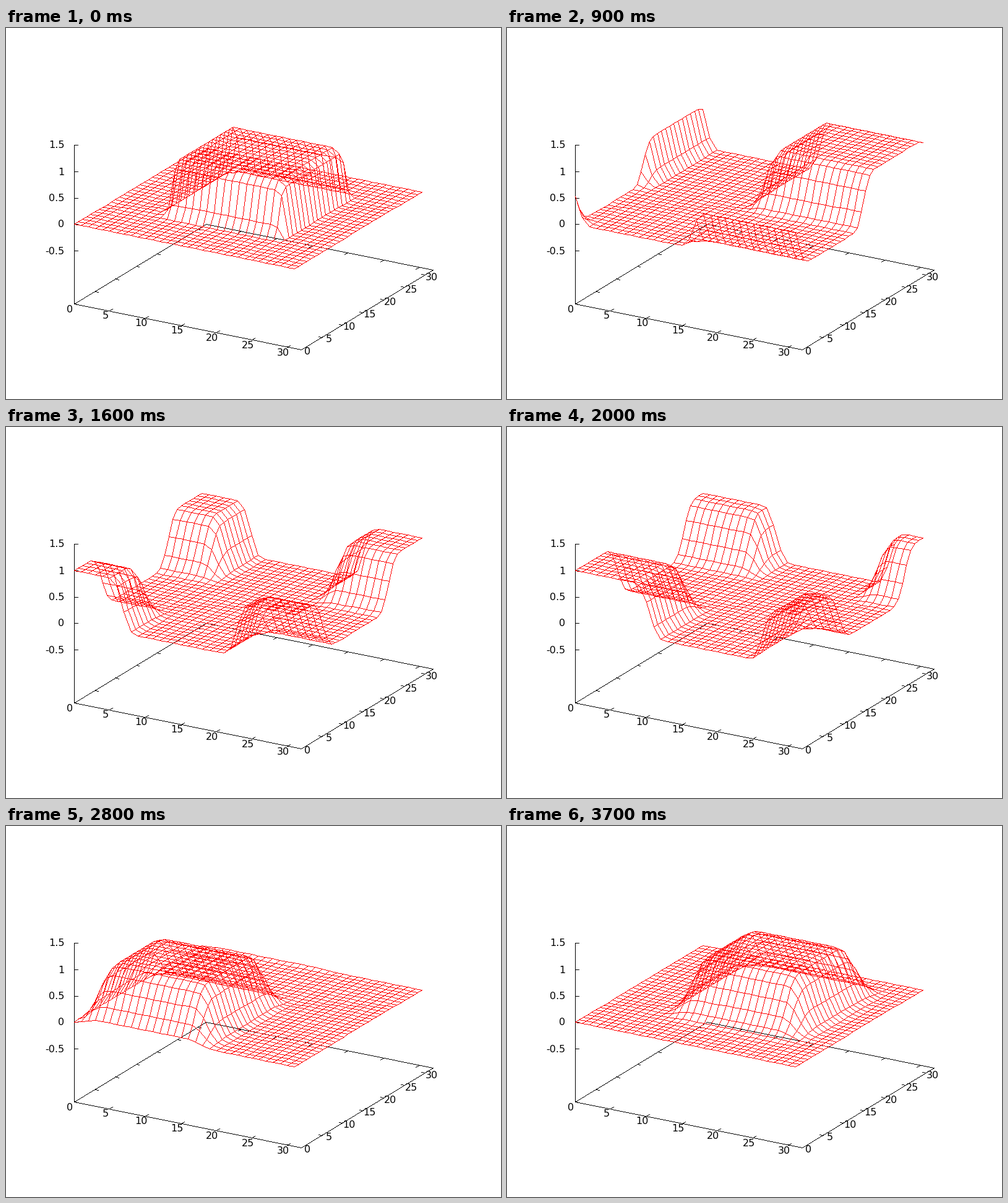
A matplotlib script that plays this animation: 800 px wide and 600 px high, repeating every 3800 ms.

```python
import numpy as np
import matplotlib.pyplot as plt
from matplotlib.animation import FuncAnimation

W, H = 800, 600
N = 32                # grid cells per side, periodic
FRAMES = 38
COURANT = 0.9
RED, BLACK = (255, 0, 0), (0, 0, 0)

TILT, TURN = np.radians([60, 30])
MIDDLE = np.array([400, 290])
SCALE = np.array([212.8, 149])
Z_MAX = 1.5


def project(x, y, z):
    """Orthographic view of the plot box, cut to whole pixels."""
    u = 2 * np.asarray(x) / N - 1
    v = 2 * np.asarray(y) / N - 1
    w = np.asarray(z) / Z_MAX
    right = np.cos(TURN) * u + np.sin(TURN) * v
    toward = np.sin(TURN) * u - np.cos(TURN) * v
    down = np.cos(TILT) * toward - np.sin(TILT) * w
    return MIDDLE + np.trunc(SCALE * np.stack([right, down], axis=-1))


def draw_segments(img, start, end, color):
    """Draw crisp one-pixel lines between pairs of points."""
    start = np.reshape(start, (-1, 2))
    delta = np.reshape(end, (-1, 2)) - start
    length = np.maximum(np.abs(delta).max(axis=1), 1)
    steps = np.arange(length.max() + 1)
    t = np.minimum(steps / length[:, None], 1)
    pts = np.rint(start[:, None] + t[..., None] * delta[:, None]).astype(int)
    img[pts[..., 1], pts[..., 0]] = color


def advect(u, c):
    """One upwind step with monotonized central slopes."""
    back = u - np.roll(u, 1)
    ahead = np.roll(u, -1) - u
    steepest = 2 * np.minimum(np.abs(back), np.abs(ahead))
    central = (back + ahead) / 2
    slope = np.where(back * ahead > 0, np.clip(central, -steepest, steepest), 0)
    flux = c * (u + 0.5 * (1 - c) * slope)
    return u - flux + np.roll(flux, 1)


def make_surfaces():
    """Split advection of a square block: y half, x full, y half step."""
    px = np.zeros(N)
    px[N // 4:3 * N // 4] = 1
    py = px.copy()
    surfaces = []
    for _ in range(FRAMES):
        px = advect(px, COURANT)
        py = advect(advect(py, COURANT / 2), COURANT / 2)
        surfaces.append(np.outer(px, py))
    return surfaces


def label(x, y, value, align="center"):
    ax.text(x, y + 6, f"{value:g}", fontsize=11.52, family="DejaVu Sans",
            ha=align, va="baseline", color="black")


def draw_axes(img):
    def line(p, q):
        draw_segments(img, p, q, BLACK)

    def floor(x, y):
        return project(x, y, -Z_MAX)

    line(floor(0, 0), project(0, 0, Z_MAX))
    for a, b in ((0, 0), (N, N)):
        line(floor(a, b), floor(N, 0))
        line(floor(a, b), floor(0, N))

    for v in range(0, N, 5):
        front, right = floor(v, 0), floor(N, v)
        line(front, floor(v, 0.75))
        line(floor(v, N), floor(v, N - 0.75))
        line(right, floor(N - 0.5, v))
        line(floor(0, v), floor(0.5, v))
        label(front[0] - 7, front[1] + 7, v)
        label(right[0] + 10, right[1] + 2, v)

    for v in np.arange(-0.5, 2, 0.5):
        p = project(0, 0, v)
        line(p, p + [6, 0])
        label(94, p[1] - 1, v, "right")


fig = plt.figure(figsize=(W / 100, H / 100), dpi=100, facecolor="white")
ax = fig.add_axes([0, 0, 1, 1])
ax.axis("off")

background = np.full((H, W, 3), 255, np.uint8)
draw_axes(background)
picture = ax.imshow(background, interpolation="nearest", aspect="auto")

grid_x, grid_y = np.meshgrid(np.arange(N), np.arange(N), indexing="ij")
surfaces = make_surfaces()


def update(frame):
    img = background.copy()
    pts = project(grid_x, grid_y, surfaces[frame])
    draw_segments(img, pts[:-1], pts[1:], RED)
    draw_segments(img, pts[:, :-1], pts[:, 1:], RED)
    picture.set_data(img)
    return [picture]


anim = FuncAnimation(fig, update, frames=FRAMES, interval=100,
                     repeat=True, repeat_delay=0)
plt.show()
```
